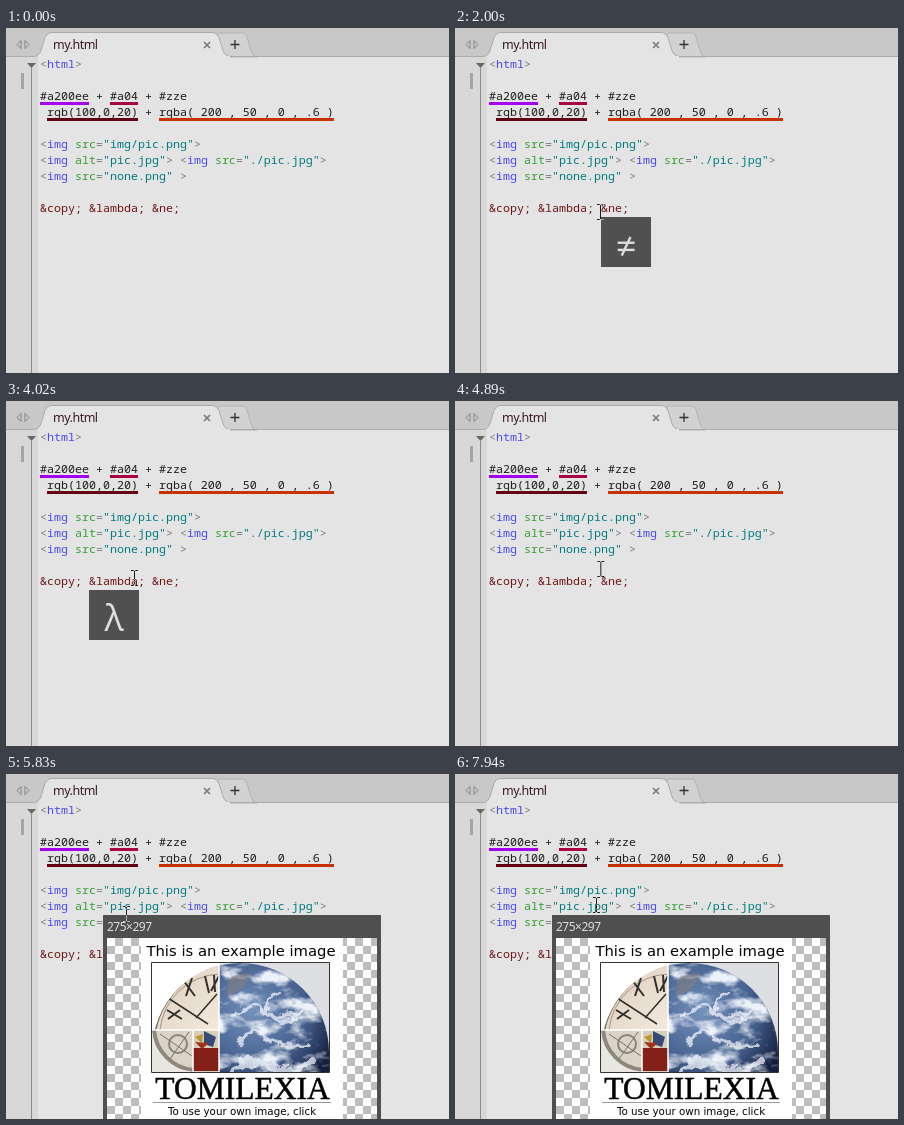
Recreate the animation shown at these times as an HTML page. Size 443 by 345 pixels, loop 8000 ms.

```html
<!DOCTYPE html>
<html lang="en">
<head>
<meta charset="utf-8">
<title>Editor hover previews</title>
<style>
html, body { margin: 0; width: 100%; height: 100%; overflow: hidden; background: #e4e4e4; }
svg { display: block; width: 443px; height: 345px; }
text { white-space: pre; }

.code { font: 11.667px "Noto Sans Mono", monospace; fill: #1c1c1c; }
.br { fill: #777; }
.tag { fill: #4a4af0; }
.attr { fill: #35a035; }
.str { fill: #007c80; }
.ent { fill: #701414; }
.ui { font-family: "Noto Sans", sans-serif; letter-spacing: -.5px; }
.demo { font-family: "DejaVu Sans", sans-serif; text-anchor: middle; }
.glyph { font: 36px "Open Sans", sans-serif; fill: #dedede; text-anchor: middle; }

.pop, #cursor { animation: 8s step-end infinite; }
.pop { opacity: 0; }
#ne { animation-name: ne; }
#lambda { animation-name: lambda; }
#copy { animation-name: copy; }
#image { animation-name: image; }
#cursor { animation-name: pointer; mix-blend-mode: difference; }

@keyframes ne { 0%, 25.75%, 61%, 100% { opacity: 0 } 17.875%, 53.375% { opacity: 1 } }
@keyframes lambda { 0%, 38.25%, 52.5%, 100% { opacity: 0 } 28.75%, 49.2% { opacity: 1 } }
@keyframes copy { 0%, 48.3%, 100% { opacity: 0 } 42.25% { opacity: 1 } }
@keyframes image { 0% { opacity: 0 } 72.875%, 100% { opacity: 1 } }

/* Each stop rests between its two times, then leaves in the given number of hops. */
@keyframes pointer {
  0%, 6.375% { transform: translate(370px, 362px); animation-timing-function: steps(11, start) }
  17.1%, 17.125% { transform: translate(177px, 188px); animation-timing-function: steps(2, start) }
  18.625%, 23.875% { transform: translate(160px, 184px); animation-timing-function: steps(2, start) }
  25.75% { transform: translate(145px, 184px); animation-timing-function: steps(4, start) }
  29.75%, 33.375% { transform: translate(124px, 184px); animation-timing-function: steps(3, start) }
  36.375%, 37.25% { transform: translate(119px, 184px); animation-timing-function: steps(3, start) }
  40.25%, 40.625% { transform: translate(79px, 180px); animation-timing-function: steps(3, start) }
  43.06%, 46.375% { transform: translate(58px, 177px); animation-timing-function: steps(5, start) }
  51.2%, 51.625% { transform: translate(128px, 177px); animation-timing-function: steps(3, start) }
  54.25%, 59% { transform: translate(158px, 180px); animation-timing-function: steps(9, start) }
  67.86%, 71.87% { transform: translate(120px, 144px) }
  71.875%, 72.87% { transform: translate(119px, 143px) }
  72.875%, 74.75% { transform: translate(120px, 140px); animation-timing-function: steps(2, start) }
  76.75%, 82.75% { transform: translate(121px, 134px); animation-timing-function: steps(7, start) }
  89.46%, 97.24% { transform: translate(138px, 133px) }
  97.25%, 99.24% { transform: translate(141px, 134px) }
  99.25%, 100% { transform: translate(141px, 131px) }
}
</style>
</head>
<body>
<svg viewBox="0 0 443 345">
  <defs>
    <pattern id="checks" x="101" y="164" width="16" height="16" patternUnits="userSpaceOnUse">
      <path fill="#fff" d="M0 0h16v16H0z"/>
      <path fill="#bdbdbd" d="M8 0h8v8H8zM0 8h8v8H0z"/>
    </pattern>
    <clipPath id="dome"><path d="M146 298V278A88.5 89 0 0 1 323 278V298z"/></clipPath>
    <clipPath id="gears"><path d="M146 256h41v42h-41z"/></clipPath>
    <radialGradient id="sea" cx=".3" cy=".45" r=".8">
      <stop offset="0" stop-color="#7391bb"/>
      <stop offset=".6" stop-color="#46618f"/>
      <stop offset="1" stop-color="#141f3d"/>
    </radialGradient>
    <linearGradient id="dial" x2="1" y2="1">
      <stop offset="0" stop-color="#8f7a66"/>
      <stop offset=".35" stop-color="#e2d6c6"/>
      <stop offset="1" stop-color="#f2eade"/>
    </linearGradient>
    <filter id="clouds" x="0" y="0" width="1" height="1" color-interpolation-filters="sRGB">
      <feTurbulence type="fractalNoise" baseFrequency=".028 .05" numOctaves="4" seed="7"/>
      <feColorMatrix values="0 0 0 0 .93  0 0 0 0 .95  0 0 0 0 .98  5 0 0 0 -2.4"/>
    </filter>
    <filter id="ragged" x="-.2" y="-.2" width="1.4" height="1.4">
      <feTurbulence type="fractalNoise" baseFrequency=".09" numOctaves="3" seed="3"/>
      <feDisplacementMap in="SourceGraphic" scale="14" xChannelSelector="R" yChannelSelector="G"/>
    </filter>
  </defs>

  <!-- window -->
  <path fill="#e4e4e4" d="M0 0h443v345H0z"/>
  <path fill="#c8c8c8" d="M0 0h443v29H0z"/>
  <path fill="#d8d8d8" d="M0 29h32v316H0z"/>
  <path fill="#8c8c8c" d="M25 40h1v305h-1z"/>
  <path fill="#d2d2d2" stroke="#b4b4b4" d="M212 29V5h25q3 0 4 4l4 14q1 5 6 6z"/>
  <path fill="#e4e4e4" stroke="#aaa" d="M-1 28.5H27q6 0 8-6l4-13q2-5 6-5H207q4 0 6 5l4 13q2 6 8 6H444"/>
  <path fill="#e4e4e4" d="M32 28h192v3H32z"/>
  <path fill="none" stroke="#858585" d="M15 12.5v8l-4-4zM19 12.5v8l4-4z"/>
  <text class="ui" x="47" y="21" font-size="12.5" fill="#3a1a28">my.html</text>
  <path stroke="#777" stroke-width="1.6" d="M198 14l6 6m0-6l-6 6"/>
  <path stroke="#333" stroke-width="1.3" d="M224.500 16.500h9m-4.500-4.500v9"/>
  <path fill="#666" d="M21 35h9l-4.500 5z"/>
  <path fill="#a5a5a5" d="M15 45h3v16h-3z"/>

  <!-- document -->
  <g class="code">
    <text x="34" y="40"><tspan class="br">&lt;</tspan><tspan class="tag">html</tspan><tspan class="br">&gt;</tspan></text>
    <text x="34" y="72">#a200ee + #a04 + #zze</text>
    <text x="41" y="88">rgb(100,0,20) + rgba( 200 , 50 , 0 , .6 )</text>
    <text x="34" y="120"><tspan class="br">&lt;</tspan><tspan class="tag">img</tspan><tspan class="attr"> src</tspan><tspan class="br">=</tspan><tspan class="str">"img/pic.png"</tspan><tspan class="br">&gt;</tspan></text>
    <text x="34" y="136"><tspan class="br">&lt;</tspan><tspan class="tag">img</tspan><tspan class="attr"> alt</tspan><tspan class="br">=</tspan><tspan class="str">"pic.jpg"</tspan><tspan class="br">&gt; &lt;</tspan><tspan class="tag">img</tspan><tspan class="attr"> src</tspan><tspan class="br">=</tspan><tspan class="str">"./pic.jpg"</tspan><tspan class="br">&gt;</tspan></text>
    <text x="34" y="152"><tspan class="br">&lt;</tspan><tspan class="tag">img</tspan><tspan class="attr"> src</tspan><tspan class="br">=</tspan><tspan class="str">"none.png"</tspan><tspan class="br"> &gt;</tspan></text>
    <text class="ent" x="34" y="184">&amp;copy; &amp;lambda; &amp;ne;</text>
  </g>
  <g stroke-width="3">
    <path stroke="#a200ee" d="M34 75.500h49"/>
    <path stroke="#a04" d="M104 75.500h28"/>
    <path stroke="#640014" d="M41 91.500h91"/>
    <path stroke="#c83200" d="M153 91.500h175"/>
  </g>

  <!-- entity previews -->
  <g class="pop" id="copy"><path fill="#505050" d="M34 189h50v50H34z"/><text class="glyph" x="59" y="230">©</text></g>
  <g class="pop" id="lambda"><path fill="#505050" d="M83 189h50v50H83z"/><text class="glyph" x="108" y="230">λ</text></g>
  <g class="pop" id="ne"><path fill="#505050" d="M146 189h50v50h-50z"/><text class="glyph" x="171" y="231">≠</text></g>

  <!-- image preview -->
  <g class="pop" id="image">
    <path fill="#4f4f4f" d="M97 141h278v204H97z"/>
    <text class="ui" x="101" y="157" font-size="12" fill="#dedede">275×297</text>
    <path fill="url(#checks)" d="M101 164h270v181H101z"/>
    <path fill="#fff" d="M135 164h202v181H135z"/>
    <text class="demo" x="235" y="182" font-size="14.8">This is an example image</text>

    <path fill="#fff" d="M145 188h68v110h-68z"/>
    <path fill="#dedfe2" d="M213 188h111v110H213z"/>
    <g clip-path="url(#dome)">
      <path fill="url(#dial)" d="M145 188h68v68h-68z"/>
      <g fill="none" stroke="#33302d">
        <path stroke="#6f5f50" stroke-width="3" d="M147 268A87 87 0 0 1 213 190"/>
        <path stroke="#a5927e" d="M154 256A62 62 0 0 1 213 200"/>
        <path stroke-width="2" d="M161 236l15 9m-14 0l12-9M177 206l12 16m-9 0l6-18M199 202l4 17m5-18l1 17m-4-1l8-15"/>
        <path stroke-width="1.500" d="M162 224l40 26m9-30l-21 24"/>
      </g>
      <path fill="url(#sea)" d="M213 188h111v110H213z"/>
      <path filter="url(#clouds)" d="M213 188h111v110H213z"/>
      <g fill="none" stroke="#eef2f8" stroke-linecap="round" filter="url(#ragged)">
        <path stroke-width="7" opacity=".75" d="M228 294q25-12 43-1t38-9"/>
        <path stroke-width="4" opacity=".75" d="M228 240q18-14 34-3t40 0M232 268q12-15 28-5t40 7M271 219q-15 8-7 20t25 7"/>
      </g>
      <path fill="#9a8570" opacity=".4" d="M222 205q15-8 24-5l-9 14-16 9z"/>
    </g>
    <g clip-path="url(#gears)">
      <path fill="#e9e7e2" d="M146 256h41v42h-41z"/>
      <circle cx="191" cy="253" r="43" fill="#d9d3c8" stroke="#8d877d" stroke-width="4"/>
      <circle cx="172" cy="270" r="9" fill="none" stroke="#8a8378" stroke-width="2"/>
      <path fill="none" stroke="#77716a" d="M154 260l32 22m-3-24l-19 27"/>
    </g>
    <path fill="#d8cdb8" d="M187 256h26v42h-26z"/>
    <path fill="#832018" d="M187 274h26v23h-26z"/>
    <path fill="#344b78" d="M198 257l12 6-3 10-9-3z"/>
    <path fill="#bd952d" d="M189 263l8-3-1 9z"/>
    <path fill="#a5321f" d="M189 268l14 1-7 6z"/>
    <path fill="none" stroke="#fff" stroke-width="1.500" d="M213 188v110M146 256h67M187 256v42"/>
    <path fill="none" stroke="#333" d="M145.500 188.500h178v110h-178z"/>

    <text x="236.500" y="325" font-family="Liberation Serif, serif" font-size="31.5" text-anchor="middle" stroke="#000" stroke-width=".5">TOMILEXIA</text>
    <path stroke="#999" d="M147 328.500h178"/>
    <text class="demo" x="236" y="341" font-size="10.3">To use your own image, click</text>
  </g>

  <g id="cursor">
    <path fill="none" stroke="#fff" d="M-3-7.500h2.500l1 1 1-1H4M.5-7V7M-3 7.500h2.500l1-1 1 1H4"/>
  </g>
</svg>
</body>
</html>
```
